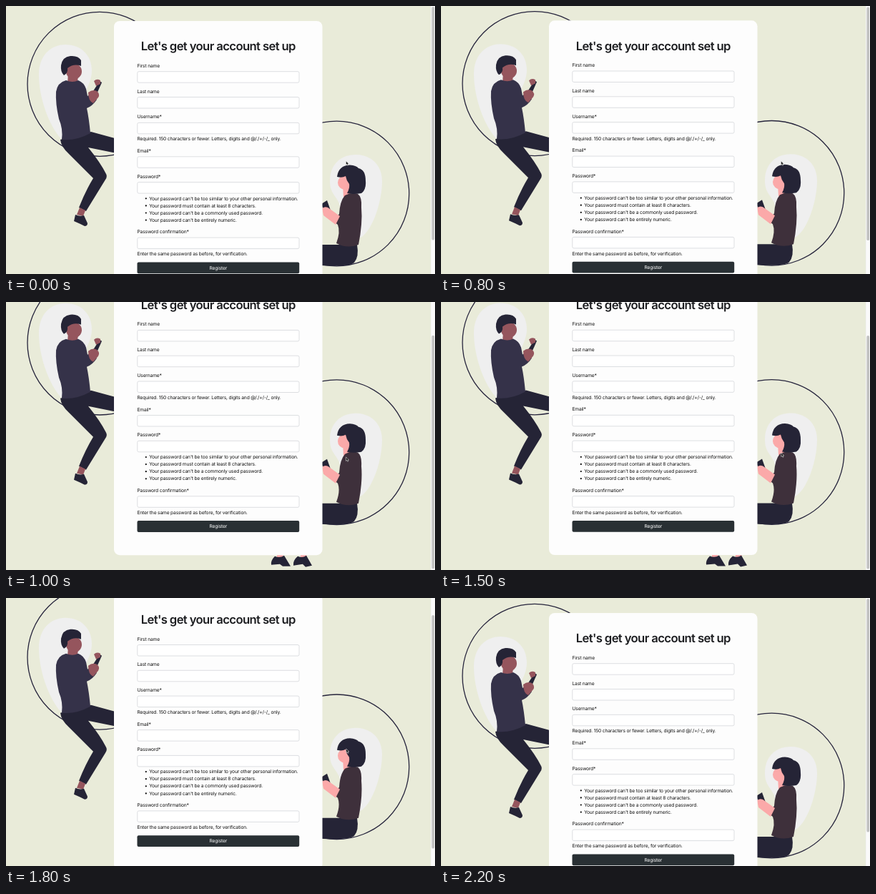
These frames come from a looping animation (600x375 px, 3.1 s). An HTML page:

```html
<!DOCTYPE html>
<html lang="en">
<head>
<meta charset="utf-8">
<title>Account set up</title>
<style>
  html, body { margin: 0; width: 100%; height: 100%; overflow: hidden; background: #e9ebd9; }
  svg { display: block; width: 600px; height: 375px; }
  text { font: 6.667px Inter, "Open Sans", sans-serif; letter-spacing: -.024em; fill: #111; text-rendering: geometricPrecision; }
  .title { font-size: 16.667px; font-weight: 600; letter-spacing: -.037em; fill: #1c1d20; }
  .middle { text-anchor: middle; }
  .ring { fill: none; stroke: #26243c; stroke-width: 1.3; }
  .blob { fill: #efefef; }
  .dark { fill: #252436; }
  .field { fill: #fff; stroke: #ced2d6; stroke-width: .7; }
</style>
</head>
<body>
<svg viewBox="0 0 600 375">
  <rect width="600" height="375" fill="#e9ebd9"/>
  <g id="page">
    <g id="man">
      <path class="blob" d="M83 54C105 54 120 69 120 90C120 109 109 116 109 135C109 160 113 195 94 195C72 195 46 140 46 96C46 70 62 54 83 54Z"/>
      <circle class="ring" cx="131" cy="109.300" r="101"/>
      <path class="dark" d="M76 187L119 176L152 185V205.500L115 198Q132 219 140 235Q142 239 139 243L112 287L102 282Q111 259 122 241L88 207Q77 197 76 187Z"/>
      <path fill="#95555d" d="M103 282L111 286L108 294L99 292Z"/>
      <path class="dark" d="M97 292Q103 295 109 293L114 304Q114 308 110 308L104 305L95 301Z"/>
      <path fill="#95555d" d="M87 94H101L100 108H86Z"/>
      <path fill="#353249" d="M84 104Q93 108 101 104Q109 107 112 116L114 126L120 122L127 131Q121 140 113 143Q116 157 118 178Q98 189 78 187Q80 172 74 158Q69 136 70 120Q72 107 84 104Z"/>
      <path class="dark" d="M131 105L134 107L126 125L120 122Z"/>
      <path fill="#95555d" d="M123 105Q127 101 132 104L132 109L126 112Z M115 121Q121 116 127 119Q132 123 129 128L122 136Q115 133 115 121Z"/>
      <circle cx="95" cy="91.500" r="11" fill="#95555d"/>
      <path class="dark" d="M81 97Q76 92 77 83Q79 71 90 70Q101 69 105 76L105 84Q95 80 86 87Q87 94 81 97Z"/>
    </g>
    <g id="woman">
      <path class="blob" d="M489 208C511 208 526 223 526 245C526 279 508 326 489 326C476 326 470 297 466 276C460 264 453 261 453 245C453 222 468 208 489 208Z"/>
      <circle class="ring" cx="462.500" cy="262.500" r="101.300"/>
      <path class="dark" d="M440 334H491Q494 351 487 359Q481 365 440 363Z"/>
      <path fill="#fba9a9" d="M379 400H388L387 413H379Z M412 400H421L420 413H412Z"/>
      <path class="dark" d="M376 408Q383 411 389 407L398 422H387L383 419L371 420Q370 414 376 408Z M408 408Q415 411 420 407L428 421L419 423L415 419L402 421Q401 414 408 408Z"/>
      <path fill="#fba9a9" d="M471 250H483L482 267H472Z"/>
      <path fill="#3e303b" d="M474 265Q483 260 492 263Q498 267 497 282Q499 304 493 334Q477 340 462 332Q468 316 464 306L458 301L466 291Q467 273 474 265Z"/>
      <path class="dark" d="M441 277L449 272L454 286L446 291Z"/>
      <path fill="#fba9a9" d="M442 283Q448 279 453 284L467 294L461 306L444 293Z"/>
      <circle cx="474" cy="247" r="10" fill="#fba9a9"/>
      <path class="dark" d="M463 239Q465 223 481 222.500Q490 223 493 227Q503 229 503 245Q504 257 497 262Q486 264 477 262Q481 255 480 249Q476 244 475 238Q470 241 463 239Z"/>
    </g>
    <rect x="151" y="21" width="291.500" height="385.500" rx="8" fill="#fdfdfd"/>
    <text class="title middle" x="296.800" y="62.300">Let's get your account set up</text>
    <g id="form"></g>
    <rect x="183.500" y="358.400" width="226.700" height="15.800" rx="2" fill="#293034"/>
    <text class="middle" x="296.800" y="368.700" style="fill:#fff">Register</text>
  </g>
  <path fill="#fafafa" d="M594 0H600V375H594Z"/>
  <path stroke="#e4e4e4" stroke-width=".5" d="M594.200 0V375"/>
  <rect id="thumb" x="595.400" y="1" width="3.700" height="326.500" rx="1.850" fill="#c1c1c1"/>
  <path id="cursor" d="M0 0V5.400L1.300 4.300L2.200 6.300L3.200 5.800L2.300 3.900H4Z" fill="#111" stroke="#fff" stroke-width=".5"/>
</svg>
<script>
const $ = id => document.getElementById(id);

// [label, label baseline, field top]
const fields = [
  ["First name", 85.8, 91.7], ["Last name", 121.6, 127.5], ["Username*", 157.4, 163.3],
  ["Email*", 204.9, 210.8], ["Password*", 240.7, 246.6], ["Password confirmation*", 318.3, 324.1]
];
const hints = [
  ["Required. 150 characters or fewer. Letters, digits and @/./+/-/_ only.", 188.3],
  ["Enter the same password as before, for verification.", 349.3]
];
const rules = [
  "can't be too similar to your other personal information.",
  "must contain at least 8 characters.",
  "can't be a commonly used password.",
  "can't be entirely numeric."
];
const text = (x, y, s) => `<text x="${x}" y="${y}">${s}</text>`;

$("form").innerHTML =
  fields.map(([label, y, top]) => text(183.5, y, label) +
    `<rect class="field" x="183.800" y="${top}" width="226.200" height="15.500" rx="2"/>`).join("") +
  hints.map(([s, y]) => text(183.5, y, s)).join("") +
  rules.map((s, i) => text(200.2, 271.5 + i * 10.1, "Your password " + s) +
    `<circle cx="195.800" cy="${269.3 + i * 10.1}" r="1.100"/>`).join("");

// [time, scroll offset], held until the next entry
const scroll = [
  [0, 0], [800, .7], [900, 33], [1000, 52.3], [1200, 52.5], [1600, 51.5],
  [1700, 44], [1800, 26.2], [1900, 1.3], [2000, .4], [2100, 0]
];

function draw(now) {
  const t = now % 3100;
  const y = scroll.findLast(([time]) => time <= t)[1];
  $("page").setAttribute("transform", `translate(0 ${-y})`);
  $("thumb").setAttribute("y", 1 + y * .877);
  $("cursor").setAttribute("transform", t < 1500 ? "translate(475.500 217)" : "translate(475.800 211)");
  $("cursor").style.display = t < 2100 ? "" : "none";
  requestAnimationFrame(draw);
}
draw(performance.now());
</script>
</body>
</html>
```
